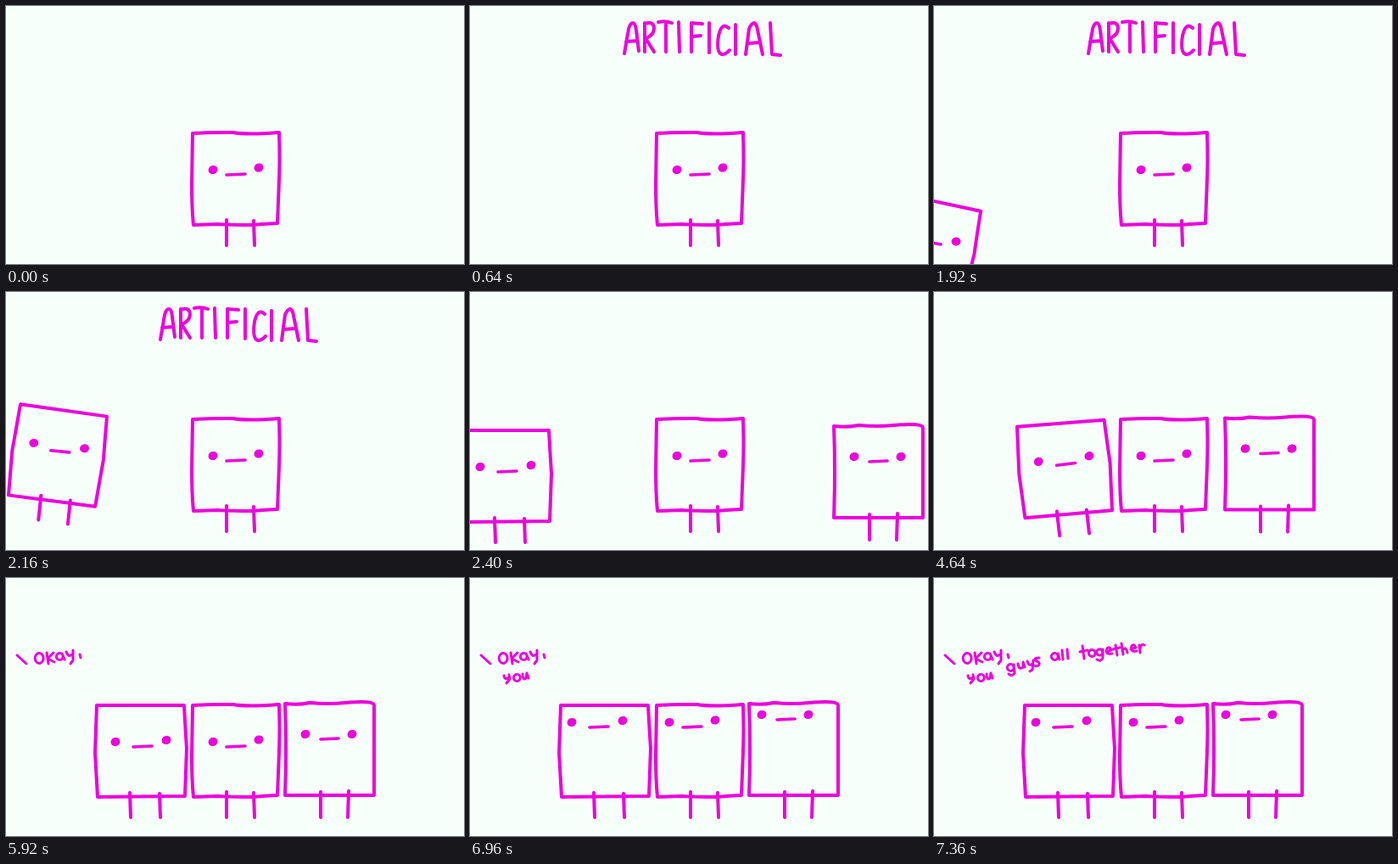
These frames come from a looping animation (540 by 304 pixels, 8000 ms). An HTML page:

```html
<!DOCTYPE html>
<html lang="en">
<head>
<meta charset="utf-8">
<title>Three square friends</title>
<style>
html, body { margin: 0; width: 100%; height: 100%; overflow: hidden; background: #f7fffb; }
svg { display: block; width: 100vw; height: 100vh; }
path { fill: none; stroke: #ec00dc; stroke-linecap: round; stroke-linejoin: round; stroke-width: 4; }
ellipse { fill: #ec00dc; }
#speech path { stroke-width: 3; }
.face path { stroke-width: 3.6; }
</style>
</head>
<body>
<svg viewBox="0 0 540 304">
  <g id="title" role="img" aria-label="ARTIFICIAL"></g>
  <g id="cast"></g>
  <g id="speech" role="img" aria-label="Okay, you guys all together"></g>
</svg>
<script>
const LOOP = 8000, STEP = 80;
const $ = id => document.getElementById(id);

function add(parent, tag, attrs = {}) {
  const el = document.createElementNS('http://www.w3.org/2000/svg', tag);
  for (const k in attrs) el.setAttribute(k, attrs[k]);
  return parent.appendChild(el);
}

// Small round letter bowl
const ring = (x, y, r = 4, ry = r) =>
  `M${x + r} ${y - 2}A${r} ${ry} 0 1 0 ${x + r} ${y + 1}Z`;

// [time of appearance, strokes]
const title = [
  [80, 'M182 56L187 27Q189 20 192 20Q195 20 196 29L199 53M184 42L197 41'],
  [160, 'M206 20V54M206 21Q217 17 217 27Q216 35 207 38L217 54M222 19Q230 17 238 20M231 20V54'],
  [320, 'M246 19L247 54'],
  [400, 'M261 54V20L274 21M261 36L272 35M282 20V55'],
  [480, 'M305 26Q297 18 293 35Q290 55 297 57Q302 57 306 52'],
  [560, 'M313 22V57M325 57L329 27Q332 20 335 20Q338 21 339 28L345 57M327 44L342 43'],
  [640, 'M354 20L356 57L366 58']
];

const speech = [
  [5920, 'M13 91L24 101' + ring(39, 95, 5, 6) +
    'M48 88L50 101M56 88L49 95L57 99' + ring(63, 93) +
    'M66 89L69 96M71 87Q74 95 79 89M79 85L79 97L76 101M87 90L88 94'],
  [6960, 'M40 115Q41 121 46 117M46 114L47 119L43 124' + ring(55, 118) +
    'M62 113Q62 121 66 118L67 112L69 118'],
  [7120, ring(90, 106) + 'M94 102L95 112Q92 117 88 113' +
    'M99 101Q100 109 105 105L105 99L107 105M110 98Q112 105 116 101M117 97L116 108L113 110' +
    'M124 94Q118 94 119 97Q125 99 124 102Q122 105 118 103'],
  [7200, ring(142, 93) + 'M146 89L148 96M151 85L152 96M157 84L158 95'],
  [7360, 'M175 80L177 95M172 87L181 85' + ring(186, 89) +
    ring(195, 88, 3.6) + 'M199 84L199 94Q197 99 192 96' +
    'M203 87L209 85Q207 80 204 83Q201 91 210 89' +
    'M214 79L216 91M211 84L219 82M221 77L223 90M222 86Q226 79 228 88' +
    'M232 84L238 82Q236 77 233 80Q231 88 239 86M242 79L243 88M243 83Q244 77 248 79']
];

const letters = [];
for (const [id, rows] of [['title', title], ['speech', speech]])
  for (const [from, d] of rows) letters.push({ from, el: add($(id), 'path', { d }) });

function square(body, legs, eyes, mouth) {
  const g = add($('cast'), 'g');
  add(g, 'path', { d: body });
  add(g, 'path', { d: legs });
  const face = add(g, 'g', { class: 'face' });
  for (const [cx, cy] of eyes)
    add(face, 'ellipse', { cx, cy, rx: 5.5, ry: 5, transform: `rotate(-20 ${cx} ${cy})` });
  add(face, 'path', { d: mouth });
  return { g, face };
}

const left = square('M107 150H210Q211 170 213 201L211 257L108 258Q107 240 105 206Z',
  'M146 253L147 282M181 254L182 282', [[129, 193], [189, 191]], 'M150 199L172 198');
const middle = square('M220 150Q245 149 268 149Q282 152 322 149Q323 180 322 205L320 256Q300 257 292 258Q260 258 250 257L221 258Q219 238 219 210Z',
  'M260 252V282M292 253L293 282', [[244, 193], [298, 190.5]], 'M260 199L282 198');
const right = square('M329 148Q344 150 358 147Q380 149 400 147Q434 144 434 150V256H329Q331 200 329 148Z',
  'M371 252V282M404 251L403 282', [[353, 184], [408, 184]], 'M371 190L392 189');

// [time, x, y, tilt], offsets from the final place
const leftPoses = [
  [1920, -165, 80, 12], [2000, -130, 30, 14], [2080, -105, -5, 10], [2160, -98, -11, 8],
  [2240, -105, 0, 4], [2320, -113, 9, 1], [2400, -117, 13, 0],
  [4640, -5, 4.5, -4.5], [4720, 0, 0, 0]
];
const rightPoses = [
  [2240, 100, 120, 0], [2320, 100, 60, 0], [2400, 100, 10, 0], [2480, 100, -25, 0],
  [2560, 100, -17.5, 0], [4640, 14, 0.5, 0], [4720, 0, 0, 0]
];

const show = (el, on) => el.setAttribute('visibility', on ? 'visible' : 'hidden');

function place({ g }, poses, t, cx, cy) {
  const pose = poses.findLast(p => p[0] <= t);
  show(g, pose);
  if (pose) g.setAttribute('transform', `translate(${pose[1]} ${pose[2]}) rotate(${pose[3]} ${cx} ${cy})`);
}

function draw(now) {
  const t = Math.floor(now % LOOP / STEP) * STEP;
  for (const { from, el } of letters) show(el, t >= from && (from > 640 || t < 2320));
  place(left, leftPoses, t, 159, 204);
  place(right, rightPoses, t, 381, 201);
  const look = t >= 6000 ? 'translate(-9 -23)' : '';
  for (const { face } of [left, middle, right]) face.setAttribute('transform', look);
}

const start = performance.now();
(function tick() {
  draw(performance.now() - start);
  requestAnimationFrame(tick);
})();
</script>
</body>
</html>
```
